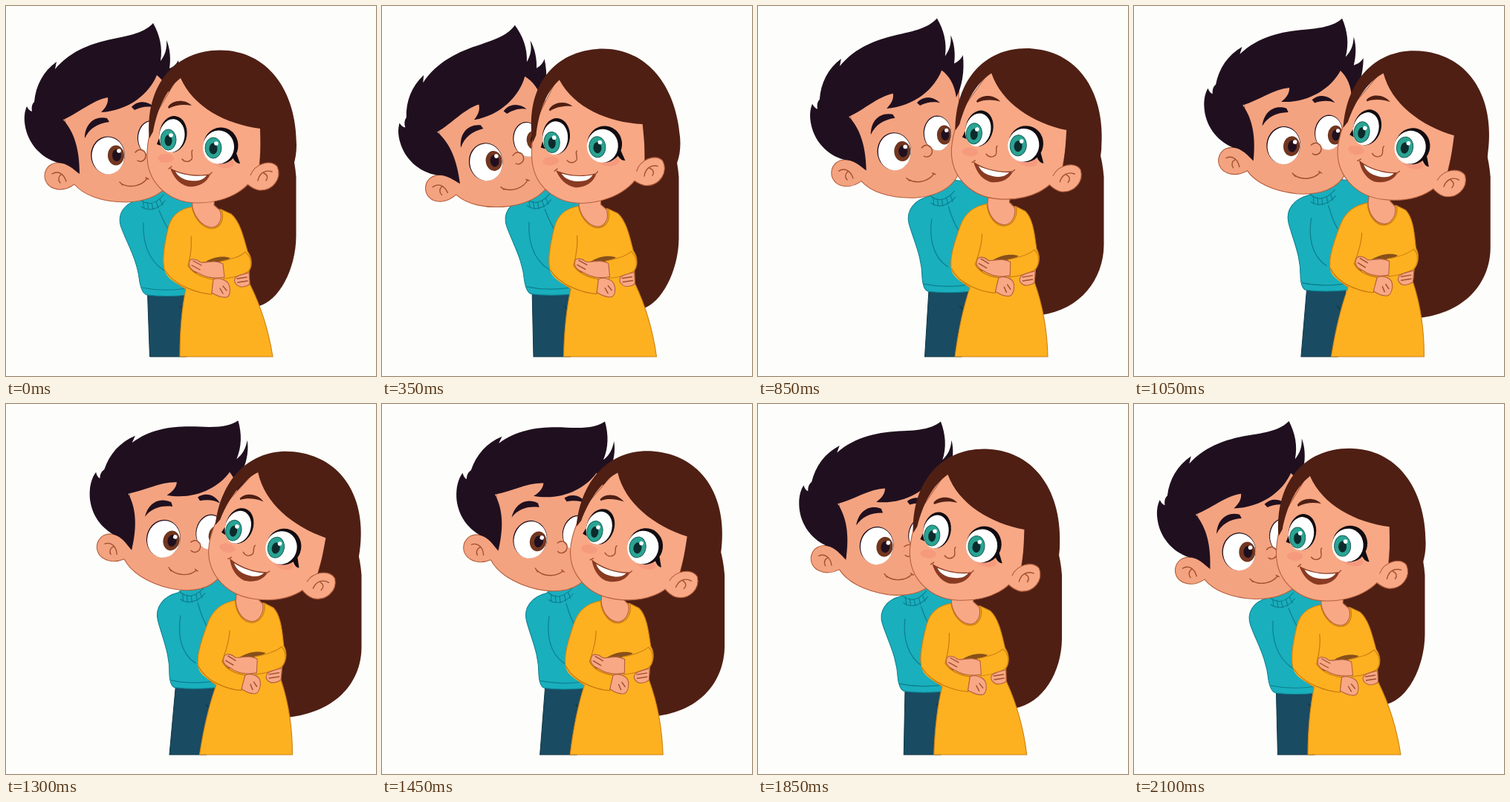
Animation, 498 px wide and 498 px high, one loop 2150 ms. Source, as an HTML page:

```html
<!DOCTYPE html>
<html>
<head>
<meta charset="utf-8">
<style>
html, body { margin: 0; width: 100%; height: 100%; overflow: hidden; background: #fdfefb; }
svg { display: block; width: 100vw; height: 100vh; }
.skin { fill: #f4a380; stroke: #b4603f; stroke-width: 1.1; }
.line { fill: none; stroke: #a0502f; stroke-width: 1.4; stroke-linecap: round; }
.fold { fill: none; stroke: #c87a10; stroke-width: 1.2; stroke-linecap: round; }
.knit { fill: none; stroke: #0e7f8f; stroke-width: 1.2; stroke-linecap: round; }
.dress { fill: #fdb120; stroke: #cf8114; stroke-width: 1.1; }
.brown { fill: #4f1f14; }
.dark { fill: #20101f; }
.white { fill: #fff; }
#woman .skin, #dress .skin { fill: #f8a885; }
</style>
</head>
<body>
<svg viewBox="0 0 498 498">
  <path id="mane" class="brown"/>

  <g id="suit">
    <path d="M190 372H243V472H193.500Z" fill="#194b62" stroke="#123848"/>
    <path d="M234 404l4 4" class="line" style="stroke:#123848"/>
    <g id="shirt">
      <path d="M178 261C158 266 149 281 155 298C164 322 177 342 180 372C182 382 185 388 190 389Q215 392 245 389L264 275L256 244L200 238L186 252Z" fill="#19afbd" stroke="#0e7f8f"/>
      <path class="knit" d="M185 292C184 315 190 342 213 356M206 275C212 290 216 298 222 306M180 260C190 269 202 267 212 254M184 262l2 10M190 264l2 10M196 265l2 9M202 263l3 9M207 260l4 8M182 270C192 277 205 274 214 262M183 379Q212 385 243 380"/>
    </g>
  </g>

  <g id="man">
    <path class="skin" d="M78 150L98 222C86 208 54 204 52 228C52 246 74 253 92 240C104 254 128 264 162 264C192 263 216 252 224 230L226 110L205 85L130 100Z"/>
    <path class="line" d="M62 226C70 221 78 226 81 236M74 227C70 230 70 235 73 238"/>
    <clipPath id="eyes"><ellipse cx="137.500" cy="201.500" rx="22" ry="25"/><ellipse cx="196" cy="178" rx="18" ry="23"/></clipPath>
    <g class="dark"><ellipse cx="137" cy="200.800" rx="22.800" ry="25.400"/><ellipse cx="195.500" cy="177.300" rx="18.600" ry="23.400"/></g>
    <g clip-path="url(#eyes)">
      <path class="white" d="M100 140H220V240H100Z"/>
      <g fill="#713620"><ellipse cx="148" cy="201" rx="11" ry="13.500"/><ellipse cx="205" cy="180" rx="10" ry="13"/></g>
      <g class="dark"><ellipse cx="149" cy="201" rx="6" ry="8"/><ellipse cx="206" cy="180" rx="5.500" ry="7.500"/></g>
      <g class="white"><circle cx="152" cy="195" r="2.800"/><circle cx="208" cy="174" r="2.600"/></g>
      <path id="lid" fill="#ec9a76" stroke="#a0502f" d="M100 110L220 62V147L168 150V176H100Z"/>
    </g>
    <path class="skin" style="stroke:none" d="M170 199C177 192 190 194 188 205C186 210 179 211 175 208Z"/>
    <path class="line" d="M174 197C180 190 189 194 188 203C187 208 181 211 177 208M155 239C167 246 183 242 190 232M153 237l4 4M188 231l4 2"/>
    <path class="dark" d="M106 178C106 160 118 147 136 151L139 156C123 158 112 165 106 178ZM169 136C178 126 192 128 200 137C192 134 181 136 173 140Z"/>
    <path class="dark" d="M99 226C91 220 82 211 70 211C46 204 29 184 25.500 160C24 150 25 142 28 135C30 139 32 141 35 142C34 136 35 132 38 129C40 107 50 88 68 75L66 85C88 59 118 49 150 43C177 38 190 32 198 23C207 39 211 56 208 74C214 66 217 58 216 46C221 57 222 72 220 84C225 82 229 79 232 73C234 95 230 115 222 130C220 112 213 101 203 93C193 118 165 141 128 143C134 137 138 131 137 123C116 127 98 144 77 153C92 170 99 193 99 226Z"/>
  </g>

  <g id="dress">
    <path class="dress" d="M252 270C233 273 222 282 218 300C213 322 209 344 214 356C222 369 234 376 242 381C236 410 234 440 234 472H359C354 440 345 408 328 374L327 357C332 349 331 338 325 330C320 312 315 290 303 280L290 274Z"/>
    <path class="skin" d="M250 248L251 271C255 288 267 298 278 298C287 297 292 286 288 275L280 268L281 250Z"/>
    <path class="fold" d="M250 270C254 289 267 300 278 299.500C290 298 294 286 290 274"/>
    <path d="M266 346C278 337 293 336 302 339C294 346 280 349 266 346Z" fill="#87501a"/>
    <path class="dress" d="M288 344C302 341 315 338 322 331C331 338 332 352 325 358C315 364 303 366 293 367Z"/>
    <path class="skin" d="M292 347C281 341 270 346 262 345C256 340 248 339 247 344C245 350 248 355 258 359C271 367 284 367 294 365Z"/>
    <path class="line" d="M250 349l11 6M252 343l11 6M247 355l9 4"/>
    <path class="dress" d="M214 350C211 362 224 371 237 377C249 383 264 387 277 388L279 368C264 366 249 358 245 350Z" style="stroke:none"/>
    <path class="fold" d="M249 310C251 327 247 341 245 350C252 360 265 366 279 368L277 388C261 387 228 378 214 356"/>
    <path class="skin" d="M279 368C286 365 295 368 299 373C303 380 302 390 297 392C290 393 282 389 277 386Z"/>
    <path class="line" d="M292 377l5 6M288 380l4 7"/>
    <path class="skin" d="M327 359C319 361 309 363 308 367C306 372 311 377 316 378C322 378 327 376 328 374Z"/>
    <path class="line" d="M311 367l13 -2M312 372l13 -2"/>
  </g>

  <g id="woman">
    <path class="skin" d="M199 150C193 170 189 187 190 205C192 241 222 266 260 265C301 264 331 245 341 215L346 160L300 95L238 85Z"/>
    <path class="brown" d="M193 178C187 108 226 59.500 288 59.500C351 59.500 391 112 391 187C391 228 368 252 328 258C338 243 344 228 342 165C296 159 252 136 235 97C214 113 203 142 198 169Z"/>
    <path class="skin" d="M329 228C335 212 356 206 365 216C372 232 359 249 341 248C335 247 330 244 325 240"/>
    <path class="line" d="M339 235C341 225 349 220 358 223M347 225C352 227 353 231 350 235"/>
    <g fill="#f58e78" opacity=".5"><ellipse cx="215" cy="205" rx="11" ry="6"/><ellipse cx="293" cy="211" rx="14" ry="7" transform="rotate(8 293 211)"/></g>
    <path d="M203 186L211 189L206 178ZM304 202C308 210 311 212 315 212L310 198Z" fill="#120b10"/>
    <g fill="#120b10"><ellipse cx="225" cy="172.500" rx="18.500" ry="24.500" transform="rotate(8 225 172)"/><ellipse cx="289" cy="188" rx="23.500" ry="24.500" transform="rotate(8 289 188)"/></g>
    <g class="white"><ellipse cx="223.500" cy="174.500" rx="17" ry="22.500" transform="rotate(8 223 174)"/><ellipse cx="286" cy="190" rx="21" ry="22.500" transform="rotate(8 286 190)"/></g>
    <g fill="#2ba393" stroke="#176358"><ellipse cx="218.500" cy="180" rx="10.500" ry="14"/><ellipse cx="279" cy="191" rx="11" ry="14"/></g>
    <g fill="#0d2b2c"><ellipse cx="218.500" cy="181" rx="5" ry="7.500"/><ellipse cx="279" cy="192" rx="5.500" ry="7.500"/></g>
    <g class="white"><circle cx="222" cy="174" r="2.800"/><circle cx="283" cy="185" r="2.800"/></g>
    <path class="brown" d="M218 136C224 126 241 125 250 134C239 132 228 133 219 138Z"/>
    <path class="line" d="M251 194C248 197 252 202 250 206C246 211 240 210 237 206"/>
    <path d="M221 218C239 228 259 229 275 226C270 240 256 244 245 243C233 240 225 230 221 218Z" fill="#893b22"/>
    <path class="white" d="M228 223C241 228 258 230 270 228C265 235 257 236 248 235C239 234 232 230 228 223Z"/>
    <path class="line" d="M219 219l4 -3M273 228l4 -4"/>
  </g>
</svg>
<script>
const LOOP = 2150, STEP = 50;
// time, hips x, his chest x, her chest x, hair x, hair y, woman x y angle, man x y angle
const keys = [
  [0, 0, 0, 0, 0, 0, 0, 0, 0, 0, 0, 0],
  [350, 10.5, 13, 14, 9, 3, 14, 1, -4.4, 7, 4, -6.9],
  [600, 25.5, 35, 37, 43, 5, 42, -3, -1, 30, 0, -5.9],
  [850, 31, 49, 56, 75, 12, 68, -6, 4.8, 47, -6, -1.1],
  [1300, 26.5, 50, 56, 88, 18, 77, -5, 11.6, 65, -12, 13.4],
  [1650, 8.5, 24, 21, 41, 12, 29, -3, 6.6, 30, -8, 11.1],
  [2100, 0, 2, 1, 1, 0, 1.5, 0, .2, 3, -1, 2]
];
const count = keys.length;
const at = id => document.getElementById(id);

const time = i => keys[(i + count) % count][0] + LOOP * Math.floor(i / count);
const value = (i, c) => keys[(i + count) % count][c];
const slope = (i, c) => (value(i + 1, c) - value(i, c)) / (time(i + 1) - time(i));

function tangent(i, c) {
  const before = time(i) - time(i - 1), after = time(i + 1) - time(i);
  return (slope(i - 1, c) * after + slope(i, c) * before) / (before + after);
}

// Smooth periodic curve through one column of keys
function sample(t, c) {
  let i = count - 1;
  while (keys[i][0] > t) i--;
  const h = time(i + 1) - time(i), u = (t - time(i)) / h, v = 1 - u;
  return value(i, c) * v * v * (1 + 2 * u) + value(i + 1, c) * u * u * (3 - 2 * u)
    + h * u * v * (tangent(i, c) * v - tangent(i + 1, c) * u);
}

const move = (id, transform) => at(id).setAttribute('transform', transform);

function pose(id, x, y, angle, px, py) {
  move(id, `translate(${x} ${y}) rotate(${angle} ${px} ${py})`);
}

// Leans and stretches a body about the floor line; returns its x shift at a height
function lean(id, hip, chest, stretch) {
  const k = (chest - hip) / 187;
  const shift = y => hip + k * (472 - y);
  move(id, `matrix(1 0 ${-k} ${1 + stretch} ${shift(0)} ${-472 * stretch})`);
  return shift;
}

function draw(t) {
  const [hip, his, her, hx, hy, wx, wy, wa, mx, my, ma] =
    keys[0].slice(1).map((_, c) => sample(t, c + 1));
  lean('suit', hip, his, 0);
  move('shirt', `translate(0 ${-hy * .4})`);
  const shift = lean('dress', hip, her, hy / 600);
  pose('woman', wx, wy, wa, 248, 231);
  pose('man', mx, my, ma, 175, 239);

  const low = shift(404);
  at('mane').setAttribute('d', `M${330 + hx} 150Q${384 + hx} 150 ${390.5 + hx} 230
    L${390.5 + hx} ${310 + hy}C${390 + hx} ${355 + hy} ${367 + hx * .9} ${397 + hy} ${340 + low} ${404 + hy}
    L${300 + low} 400L${277 + shift(270)} 270L${280 + shift(230)} 230Z`);

  const blink = Math.max(0, 1 - Math.abs(t - 600) / 100);
  move('lid', `translate(0 ${13 * blink - 5})`);
}

function frame(now) {
  draw(Math.floor(now % LOOP / STEP) * STEP);
  requestAnimationFrame(frame);
}
frame(performance.now());
</script>
</body>
</html>
```
